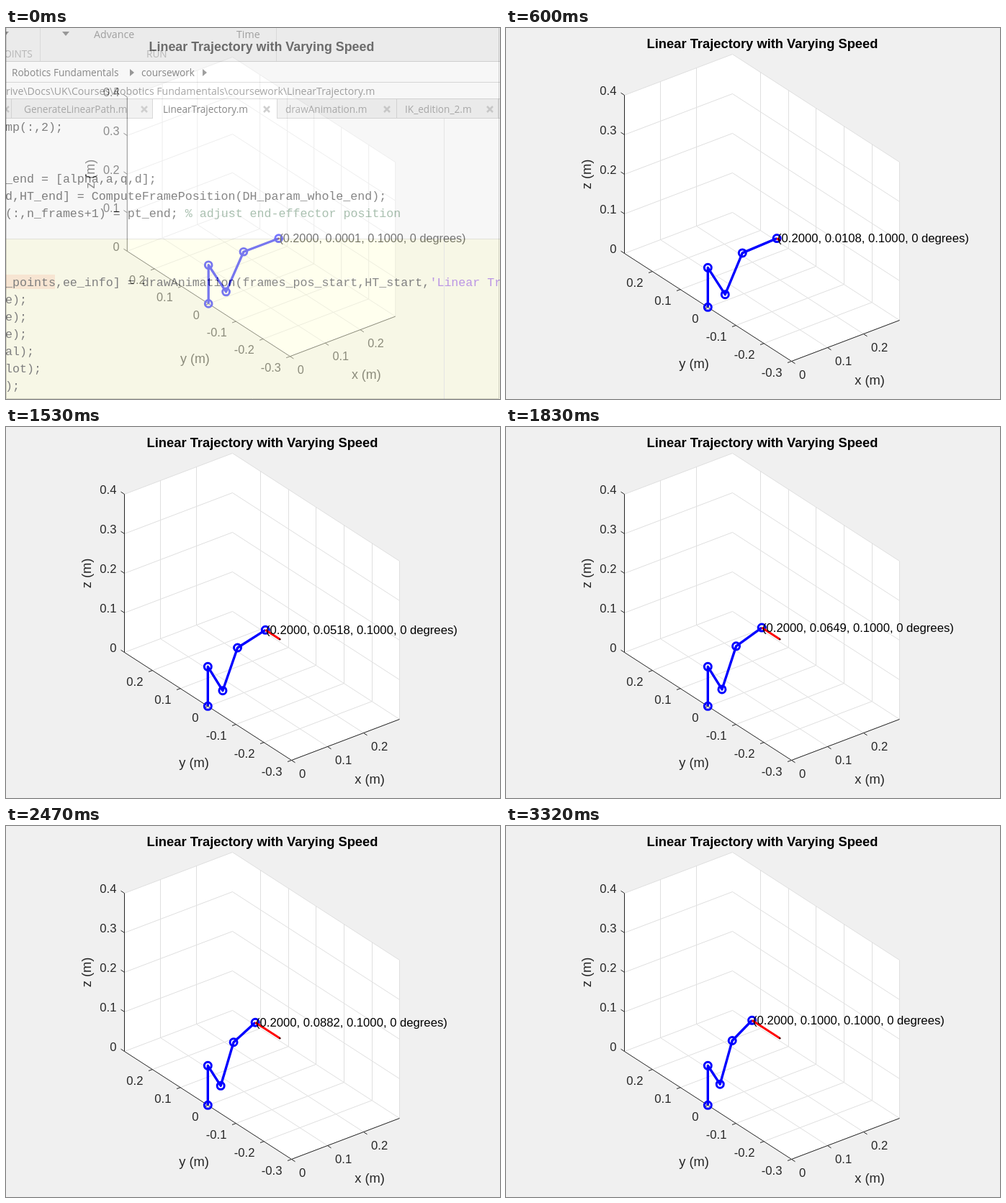
Recreate the animation shown at these times as an HTML page with a canvas. Size 686 by 516 pixels, loop 3560 ms.

```html
<!DOCTYPE html>
<html lang="en">
<head>
<meta charset="utf-8">
<title>Linear Trajectory</title>
<style>
  html, body { margin: 0; width: 100%; height: 100%; overflow: hidden; background: #f0f0f0; }
  canvas { position: absolute; left: 0; top: 0; }
</style>
</head>
<body>
<canvas id="editor" width="686" height="516"></canvas>
<canvas id="plot" width="686" height="516"></canvas>
<script>
const W = 686, H = 516, LOOP = 3560, OPENING = 50;
const SANS = '"Liberation Sans", Arial, sans-serif';
const INK = '#262626', GRID = '#dfdfdf', BLUE = '#00f', RED = '#f00';
const TICK_FONT = `16.67px ${SANS}`, LABEL_FONT = `18.33px ${SANS}`;

// Moments at which the picture is refreshed
const refreshes = [0, 50, 130, 200, 280, 360, 430, 510, 600, 680, 750,
  890, 970, 1050, 1140, 1230, 1310, 1380, 1460, 1530, 1610, 1690,
  1830, 1910, 1990, 2060, 2140, 2230, 2310, 2390, 2470,
  2610, 2690, 2770, 2840, 2930, 3010, 3090, 3160, 3320];

// Time in ms -> fraction of the planned motion
const pacing = [[0, .018], [600, .204], [1140, .388], [1530, .512],
  [2140, .692], [2840, .891], [3160, .982], [3320, 1]];

const plot = document.getElementById('plot');
const ctx = plot.getContext('2d');

function write(c, text, x, y, font, color, align = 'left') {
  c.font = font;
  c.fillStyle = color;
  c.textAlign = align;
  c.fillText(text, x, y);
}

function line(points, color, width = 1) {
  ctx.strokeStyle = color;
  ctx.lineWidth = width;
  ctx.beginPath();
  points.forEach(p => ctx.lineTo(...p));
  ctx.stroke();
}

// World coordinates in metres to pixels
const project = (x, y, z) =>
  [280.3 + 500 * x - 386.7 * y, 388.3 - 190 * x - 250 * y - 550 * z];

// The same, moved to the nearest pixel centre for crisp hairlines
const snapped = (x, y, z) => project(x, y, z).map(v => Math.round(v) + .5);

function drawEditor() {
  const c = document.getElementById('editor').getContext('2d');
  const ui = size => `${size}px "Open Sans", "Noto Sans", sans-serif`;
  const code = '16.65px "Liberation Mono", "Courier New", monospace';
  const rect = (color, x, y, w, h) => { c.fillStyle = color; c.fillRect(x, y, w, h); };
  const label = (text, x, y, color = '#111', size = 13.6) => write(c, text, x, y, ui(size), color);
  const arrow = (x, y, angle) => {
    c.save();
    c.translate(x, y);
    c.rotate(angle);
    c.fillStyle = '#333';
    c.beginPath();
    c.moveTo(-3, -5); c.lineTo(3, 0); c.lineTo(-3, 5);
    c.fill();
    c.restore();
  };
  const cross = x => {
    c.strokeStyle = '#999';
    c.lineWidth = 2.5;
    c.beginPath();
    c.moveTo(x - 4, 109); c.lineTo(x + 4, 117);
    c.moveTo(x + 4, 109); c.lineTo(x - 4, 117);
    c.stroke();
  };

  rect('#fff', 0, 0, W, H);
  rect('#e6e6e6', 0, 0, W, 46);
  [47, 375].forEach(x => rect('#c0c0c0', x, 0, 1, 46));
  rect('#a8a8a8', 0, 46, W, 1);
  rect('#b8b8b8', 0, 75, W, 1);
  rect('#e4e4e4', 0, 98, W, 28);
  rect('#fff', 203, 98, 173, 28);
  rect('#b0b0b0', 0, 98, W, 1);
  rect('#b0b0b0', 0, 125, 203, 1);
  rect('#b0b0b0', 376, 125, W - 376, 1);
  [7, 203, 376, 542, 683].forEach(x => rect('#b0b0b0', x, 98, 1, 28));
  rect('#ffffdc', 0, 293, W, H - 293);
  rect('#d0d0c0', 0, 293, W, 1);
  rect('#d8d8d8', 608, 126, 1, H - 126);
  rect('#ffd9b0', 0, 343, 68, 20);

  label('Advance', 122, 14, '#444', 14.2);
  label('Time', 320, 14, '#444', 14.2);
  label('POINTS', -11, 41, '#777');
  label('RUN', 195, 41, '#777');
  arrow(-1, 8, Math.PI / 2);
  arrow(83, 8, Math.PI / 2);
  label('Robotics Fundamentals', 8, 67);
  arrow(175, 62, 0);
  label('coursework', 188, 67);
  arrow(276, 62, 0);
  label('rive\\Docs\\UK\\Courses\\Robotics Fundamentals\\coursework\\LinearTrajectory.m', 0, 93, '#444', 14.1);
  cross(0);
  [['GenerateLinearPath.m', 25, 192], ['LinearTrajectory.m', 218, 362],
   ['drawAnimation.m', 388, 529], ['IK_edition_2.m', 554, 672]].forEach(([name, x, close]) => {
    label(name, x, 118, x === 218 ? '#000' : '#555');
    cross(close);
  });

  const codeLine = (text, y, column = 0, color = '#000') =>
    write(c, text, column * 9.99 - 1, y + 5, code, color);
  codeLine('mp(:,2);', 138);
  codeLine('_end = [alpha,a,q,d];', 210);
  codeLine('d,HT_end] = ComputeFramePosition(DH_param_whole_end);', 234);
  codeLine('(:,n_frames+1) = pt_end;', 258);
  codeLine('% adjust end-effector position', 258, 25, '#4a7a58');
  codeLine('_points,ee_info] = drawAnimation(frames_pos_start,HT_start,', 354);
  codeLine("'Linear Trajectory", 354, 59, '#8030d8');
  ['e);', 'e);', 'e);', 'al);', 'lot);', ');'].forEach((text, i) => codeLine(text, 378 + 24 * i));
}

function drawAxes() {
  const P = snapped;
  const lo = -.3, hi = .3, top = .4;
  const xs = [.1, .2], ys = [.2, .1, 0, -.1, -.2, lo], zs = [0, .1, .2, .3, top];

  ctx.fillStyle = '#fff';
  ctx.beginPath();
  [[0, hi, top], [hi, hi, top], [hi, lo, top], [hi, lo, 0], [0, lo, 0], [0, hi, 0]]
    .forEach(p => ctx.lineTo(...P(...p)));
  ctx.fill();

  xs.forEach(x => line([P(x, lo, 0), P(x, hi, 0), P(x, hi, top)], GRID));
  ys.forEach(y => line([P(0, y, 0), P(hi, y, 0), P(hi, y, top)], GRID));
  zs.forEach(z => line([P(0, hi, z), P(hi, hi, z), P(hi, lo, z)], GRID));
  line([P(0, hi, top), P(0, hi, 0), P(0, lo, 0), P(hi, lo, 0)], INK);

  const tick = ([x, y], dx, dy, text, tx, ty, align) => {
    line([[x, y], [x + dx, y + dy]], INK);
    write(ctx, text, x + tx, y + ty, TICK_FONT, INK, align);
  };
  zs.forEach(z => tick(P(0, hi, z), -5, -3.3, String(z), -11, -.5, 'right'));
  ys.forEach(y => tick(P(0, y, 0), -5.5, 2, String(y), -13, 21.5, 'right'));
  [0, ...xs].forEach(x => tick(P(x, lo, 0), 5, 3.3, String(x), 10.5, 24.5, 'left'));

  write(ctx, 'y (m)', 261, 473, LABEL_FONT, INK, 'center');
  write(ctx, 'x (m)', 505, 496, LABEL_FONT, INK, 'center');
  ctx.save();
  ctx.translate(118, 203.5);
  ctx.rotate(-Math.PI / 2);
  write(ctx, 'z (m)', 0, 0, LABEL_FONT, INK, 'center');
  ctx.restore();
  write(ctx, 'Linear Trajectory with Varying Speed', 356, 28, `bold 18.33px ${SANS}`, '#000', 'center');
}

// Four links of 0.1 m; the last one stays level
function drawArm(y) {
  const reach = Math.hypot(.2, y), wrist = reach - .1, elbow = wrist / 2;
  const at = (r, z) => project(r * .2 / reach, r * y / reach, z);
  const joints = [at(0, 0), at(0, .1), at(elbow, .1 - Math.sqrt(.01 - elbow * elbow)),
    at(wrist, .1), at(reach, .1)];
  const tip = joints[4], start = project(.2, 0, .1);

  line(joints, BLUE, 3.4);
  ctx.lineWidth = 3;
  joints.forEach(([px, py]) => {
    ctx.beginPath();
    ctx.arc(px, py, 5, 0, 2 * Math.PI);
    ctx.stroke();
  });
  line([start, tip], RED, 3);
  ctx.fillStyle = '#400';
  ctx.beginPath();
  ctx.arc(...start, 1.3, 0, 2 * Math.PI);
  ctx.fill();
  write(ctx, `(0.2000, ${y.toFixed(4)}, 0.1000, 0 degrees)`,
    Math.round(tip[0] + 1), Math.round(tip[1] + 5.7), TICK_FONT, '#000');
}

function progress(t) {
  const i = Math.max(1, pacing.findIndex(([time]) => time >= t));
  const [t0, s0] = pacing[i - 1], [t1, s1] = pacing[i];
  return s0 + (s1 - s0) * (t - t0) / (t1 - t0);
}

function render() {
  const now = performance.now() % LOOP;
  const t = refreshes.filter(r => r <= now).pop();
  const s = progress(t), opening = t < OPENING;

  plot.style.opacity = opening ? .53 : 1;
  ctx.setTransform(1, 0, 0, 1, 0, 0);
  ctx.fillStyle = '#f0f0f0';
  ctx.fillRect(0, 0, W, H);
  if (opening) {
    ctx.strokeStyle = '#aaa';
    ctx.lineWidth = 1;
    ctx.strokeRect(.5, -1, W - 2, H + .5);
    ctx.setTransform(.975, 0, 0, .975, 7.9, 4.8);
  }
  ctx.lineJoin = 'round';
  drawAxes();
  drawArm(.1 * (3 * s * s - 2 * s ** 3));
  requestAnimationFrame(render);
}

drawEditor();
render();
</script>
</body>
</html>
```
